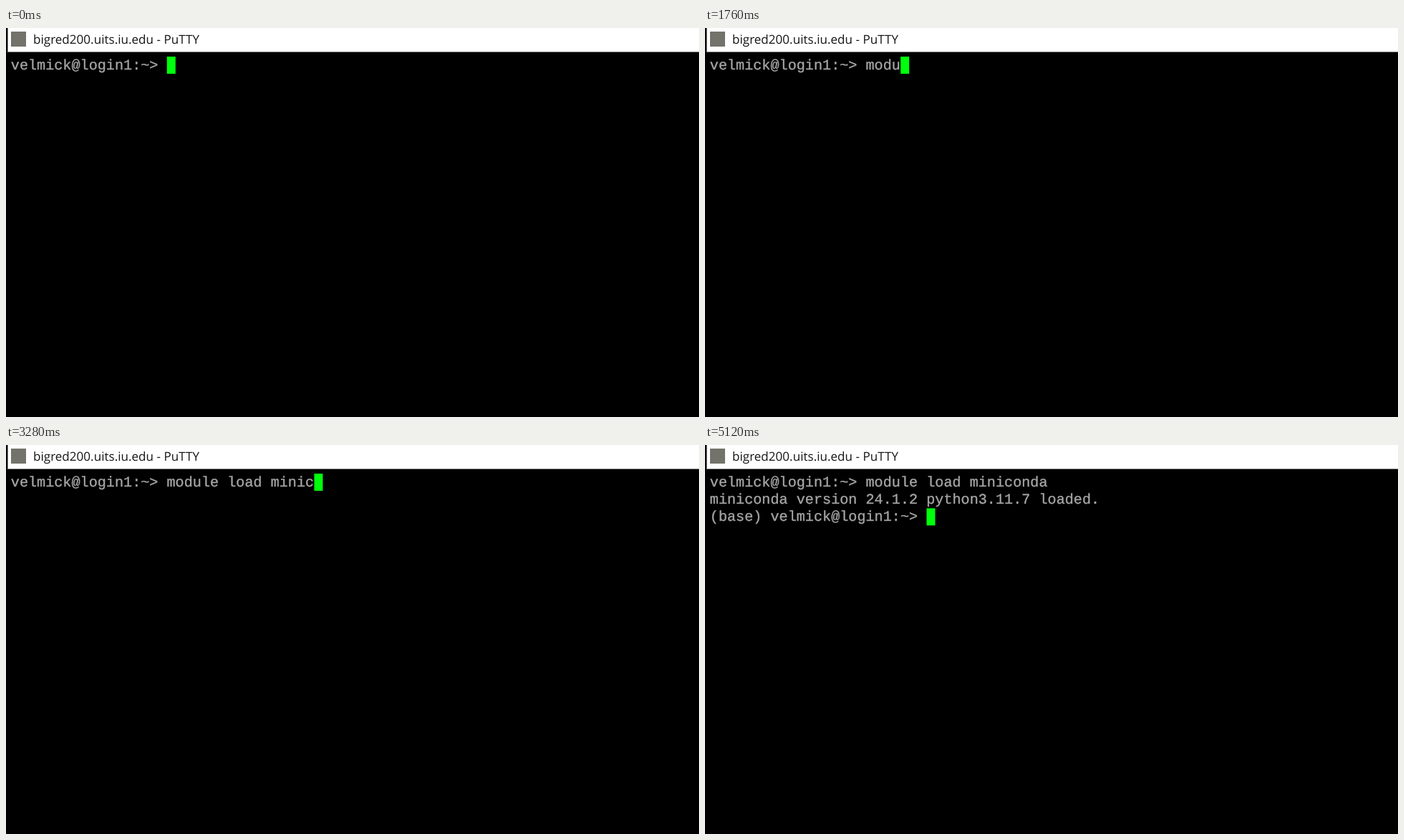
Write an HTML page that moves like this. It is 968 px wide and 544 px high and loops after 5.52 s.

```html
<!DOCTYPE html>
<html lang="en">
<head>
<meta charset="utf-8">
<title>Terminal session</title>
<style>
  html, body {
    margin: 0;
    width: 100%;
    height: 100%;
    overflow: hidden;
    background: #000;
  }
  .bar {
    position: absolute;
    left: 2px;
    right: 0;
    top: 0;
    height: 33px;
    border: solid #808080;
    border-width: 0 0 1px 1px;
    background: #fff;
    color: #161616;
    font: 17.08px/33px "Open Sans", "Noto Sans", sans-serif;
    text-rendering: geometricPrecision;
    white-space: pre;
  }
  .icon {
    position: absolute;
    left: 4px;
    top: 5px;
    width: 21px;
    height: 21px;
    background: #73736c;
  }
  .bar span {
    position: absolute;
    left: 35px;
  }
  #screen {
    position: absolute;
    left: 6.8px;
    top: 41.7px;
    margin: 0;
    color: #a6a6a6;
    font: 20.16px/24.25px "Liberation Mono", "Courier New", monospace;
    text-rendering: geometricPrecision;
    -webkit-text-stroke: 0.35px #a6a6a6;
  }
  #cursor {
    position: absolute;
    left: 7px;
    top: 40px;
    width: 12px;
    height: 24px;
    background: #00ff0c;
  }
</style>
</head>
<body>
<div class="bar"><i class="icon"></i><span>bigred200.uits.iu.edu - PuTTY</span></div>
<pre id="screen"></pre>
<div id="cursor"></div>
<script>
  const LOOP = 5520;
  const CELL = { w: 12.1, h: 24.25 };
  const PROMPT = "velmick@login1:~> ";
  const COMMAND = "module load miniconda";

  // When each character of the command is typed, in ms
  const KEYS = [
    1440, 1520, 1680, 1760, 1840, 1920, 2000,
    2080, 2320, 2400, 2480, 2560,
    2720, 2880, 2960, 3120, 3280, 3360, 3440, 3520, 3600
  ];

  // Output that follows the command
  const OUTPUT = [
    [4000, "\n"],
    [4240, "miniconda version 24.1.2 python3.11.7 loaded.\n"],
    [5040, "(base) " + PROMPT]
  ];

  const screen = document.getElementById("screen");
  const cursor = document.getElementById("cursor");
  let shown = null;

  function textAt(t) {
    const typed = KEYS.filter(k => k <= t).length;
    const output = OUTPUT.filter(([at]) => at <= t).map(([, s]) => s);
    return PROMPT + COMMAND.slice(0, typed) + output.join("");
  }

  function draw(t) {
    const text = textAt(t);
    if (text === shown) return;
    shown = text;
    screen.textContent = text;
    const lines = text.split("\n");
    const x = lines[lines.length - 1].length * CELL.w;
    const y = (lines.length - 1) * CELL.h;
    cursor.style.transform = `translate(${x}px, ${y}px)`;
  }

  let start = null;
  function tick(now) {
    if (start === null) start = now;
    draw((now - start) % LOOP);
    requestAnimationFrame(tick);
  }

  draw(0);
  requestAnimationFrame(tick);
</script>
</body>
</html>
```
